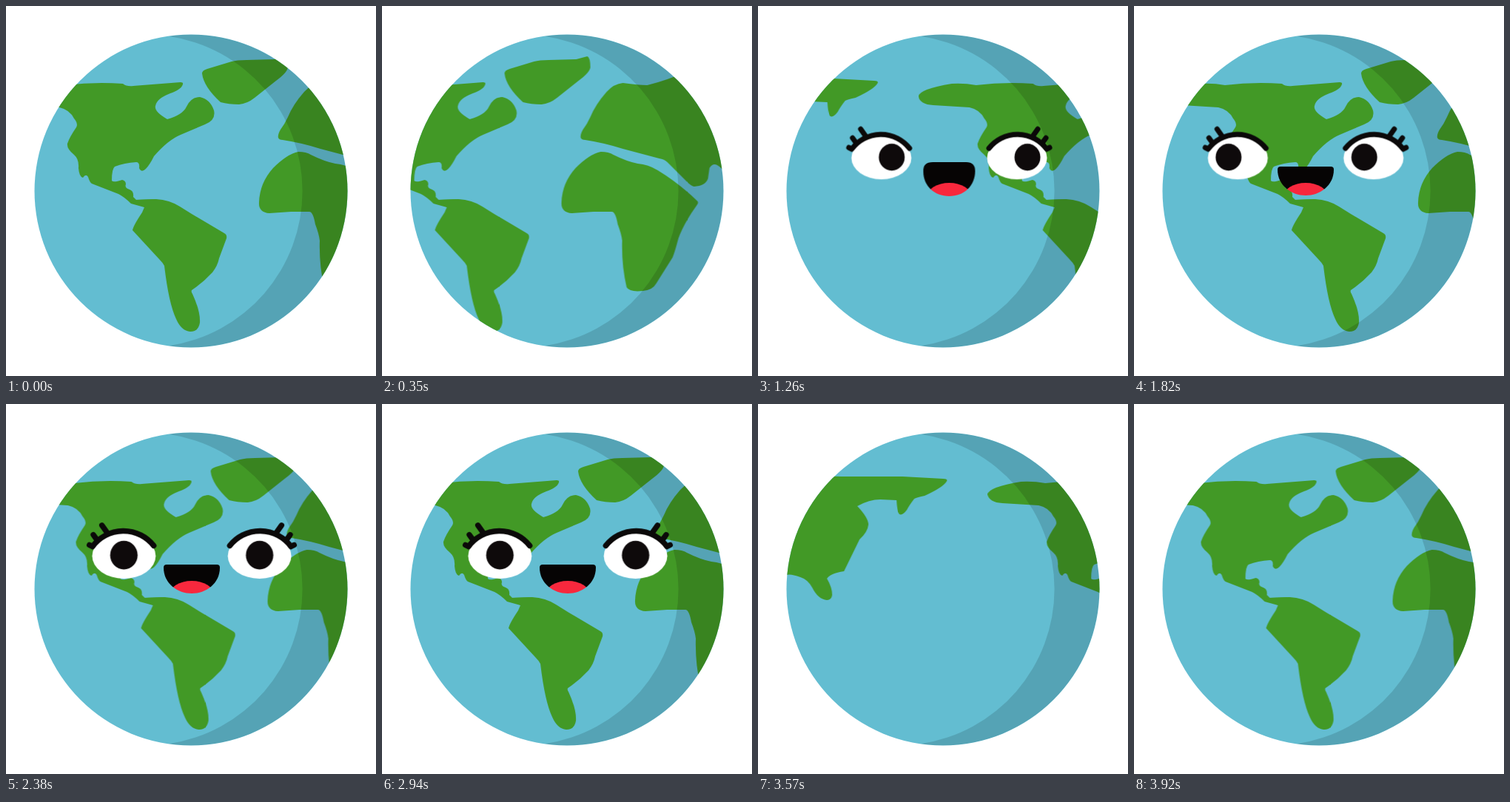
Recreate the animation shown at these times as an HTML page without scripts. Size 500 by 500 pixels, loop 3.99 s.

```html
<!DOCTYPE html>
<html lang="en">
<head>
<meta charset="utf-8">
<title>Spinning globe</title>
<style>
html, body { margin: 0; width: 100%; height: 100%; overflow: hidden; background: #fff; }
svg { display: block; width: 100vw; height: 100vh; }

.map, .face, .eye, .pupil, .mouth { animation: 3990ms linear infinite; }
.land { fill: #429926; }
.ink { fill: none; stroke: #0b0909; stroke-width: 7; stroke-linecap: round; }
.pupil { fill: #0e0a0b; animation-name: look; }
.map { animation-name: spin; }
.face { animation-name: visit; }
.eye { animation-name: widen; }
.mouth { animation-name: smile; }

/* Two full turns: a slow one that brings the face, a quick one that takes it away. */
@keyframes spin {
  0% { transform: translateX(0); animation-timing-function: cubic-bezier(.33, .05, .56, .9); }
  45.61% { transform: translateX(-842px); animation-timing-function: cubic-bezier(.2, .4, .6, 1); }
  74.04% { transform: translateX(-884px); animation-timing-function: cubic-bezier(.33, 0, .67, 1); }
  99.65%, 100% { transform: translateX(-1768px); }
}
@keyframes visit {
  0% { transform: translateX(734px); animation-timing-function: cubic-bezier(.33, 0, .67, 1); }
  36.67% { transform: translateX(232px); }
  46.2% { transform: translateX(232px); animation-timing-function: cubic-bezier(.33, 0, .67, 1); }
  57.89% { transform: translateX(251px); }
  74.04% { transform: translateX(251px); animation-timing-function: cubic-bezier(.33, 0, .67, 1); }
  99.65%, 100% { transform: translateX(-484px); }
}
@keyframes look {
  0%, 17.54% { transform: translateX(20px); animation-timing-function: ease-in; }
  31.58% { transform: translateX(14px); animation-timing-function: ease-in-out; }
  43.86%, 47.37% { transform: translateX(-12.5px); animation-timing-function: ease-in-out; }
  57.89%, 100% { transform: translateX(0); }
}
@keyframes widen {
  0%, 47.37% { transform: scale(1); animation-timing-function: ease-in-out; }
  57.89%, 74.04% { transform: scale(1.06); animation-timing-function: ease-in-out; }
  82%, 100% { transform: scale(.94); }
}
@keyframes smile {
  0%, 32% {
    d: path("M-35 224Q-36 211 -22 211L23 211Q35 211 35 223C35 243 20 257 0 257C-20 257 -35 243 -35 224Z");
    animation-timing-function: ease-in-out;
  }
  42%, 100% {
    d: path("M-38 221Q-38 217 -34 217L34 217Q38 217 38 221C38 243 19 256 0 256C-19 256 -38 243 -38 221Z");
  }
}
</style>
</head>
<body>
<svg viewBox="0 0 500 500">
  <defs>
    <clipPath id="disc"><circle cx="250" cy="250" r="211.5"/></clipPath>
    <clipPath id="lips">
      <path class="mouth" d="M-38 221Q-38 217 -34 217L34 217Q38 217 38 221C38 243 19 256 0 256C-19 256 -38 243 -38 221Z"/>
    </clipPath>

    <g id="world" class="land">
      <!-- North America -->
      <path d="M3 122Q5 112 48 105Q65 104 81 107Q120 102 158 105Q163 109 172 108L236 103Q241 103 238 108C232 119 206 118 202 135
        Q200 143 218 153Q239 147 244 136Q250 123 262 123Q276 126 281 141Q284 154 269 160L236 174Q219 181 200 203
        Q194 215 189 220Q183 226 180 219Q181 211 176 211Q160 212 147 217Q143 220 143 236Q145 239 157 235Q162 236 162 241
        Q160 246 167 248Q173 250 172 258L176 262L203 261L187 272L169 267Q160 258 152 254L116 240Q113 238 111 231
        Q108 226 104 232Q99 231 98 219Q99 207 92 201Q82 193 83 186Q86 177 95 164Q98 159 92 152Q86 140 72 137
        L23 134Q5 133 3 122Z"/>
      <!-- South America -->
      <path d="M174 262L203 261Q221 262 235 271L251 281L295 307Q299 309 298 314L288 341Q286 351 279 360Q265 375 251 384
        Q250 386 252 389Q263 413 262 428Q260 440 249 440Q237 439 230 423Q220 402 214 351Q212 347 207 342L171 303
        Q172 297 184 279L187 272Z"/>
      <!-- Greenland -->
      <path d="M265 91Q265 87 272 85L305 75Q312 73 325 73L362 72L377 68Q381 70 381 83Q380 90 365 101L336 124
        Q326 132 315 133Q301 133 290 130Q267 109 265 91Z"/>
      <!-- Eurasia -->
      <path d="M368 178Q367 174 371 167Q377 159 381 150Q388 133 403 116Q413 105 425 104Q446 107 458 107Q490 99 523 83
        Q530 80 538 81L648 96Q660 98 713 98L772 98L827 101Q833 101 832 104Q828 112 802 124Q792 126 788 128
        Q781 137 778 143Q772 151 768 149Q765 147 764 130L742 129Q727 129 711 138Q726 154 726 163Q725 173 714 183
        L693 226Q674 229 670 236Q677 248 677 258Q676 265 670 265Q658 264 650 248Q644 237 634 234Q621 229 615 231
        Q610 236 606 246Q597 260 589 249Q582 242 576 234L554 216Q547 211 542 219Q541 226 540 233Q537 243 521 244
        Q517 243 512 238L485 211Q481 207 474 206L425 193Q400 185 374 181Q369 181 368 178Z"/>
      <!-- Africa -->
      <path d="M342 265Q343 239 361 219Q380 200 395 197Q406 197 412 201Q430 210 445 213Q459 214 472 222Q500 239 525 263
        Q528 265 525 269Q507 294 500 314Q495 333 492 340L470 375Q465 384 452 385Q434 387 430 380Q423 350 424 317
        Q423 308 418 295Q415 278 410 278L385 278L356 280Q341 279 342 265Z"/>
    </g>

    <g id="lid">
      <ellipse rx="40.5" ry="29" fill="#fff"/>
      <path class="ink" d="M-40 -12A49 49 0 0 1 38 -13M-28 -39L-21 -29M-39 -27L-34 -20M-44 -14L-40 -12"/>
    </g>
    <ellipse id="pupil" cy="-1" rx="17.5" ry="18.2"/>
  </defs>

  <g clip-path="url(#disc)">
    <rect width="500" height="500" fill="#63bdd1"/>
    <g class="map">
      <use href="#world"/>
      <use href="#world" x="884"/>
      <use href="#world" x="1768"/>
    </g>

    <g class="face">
      <g transform="translate(-91.7 205.3)"><g class="eye">
        <use href="#lid"/>
        <g class="pupil"><use href="#pupil"/></g>
      </g></g>
      <g transform="translate(91.7 205.3)"><g class="eye">
        <use href="#lid" transform="scale(-1 1)"/>
        <g class="pupil"><use href="#pupil"/></g>
      </g></g>
      <g clip-path="url(#lips)">
        <rect x="-50" y="200" width="100" height="70" fill="#060404"/>
        <ellipse cy="258" rx="30" ry="19" fill="#f8283d"/>
      </g>
    </g>

    <path d="M219.5 40.7A211.5 211.5 0 1 1 219.5 459.3A211.5 211.5 0 0 0 219.5 40.7Z" fill-opacity=".135"/>
  </g>
</svg>
</body>
</html>
```
